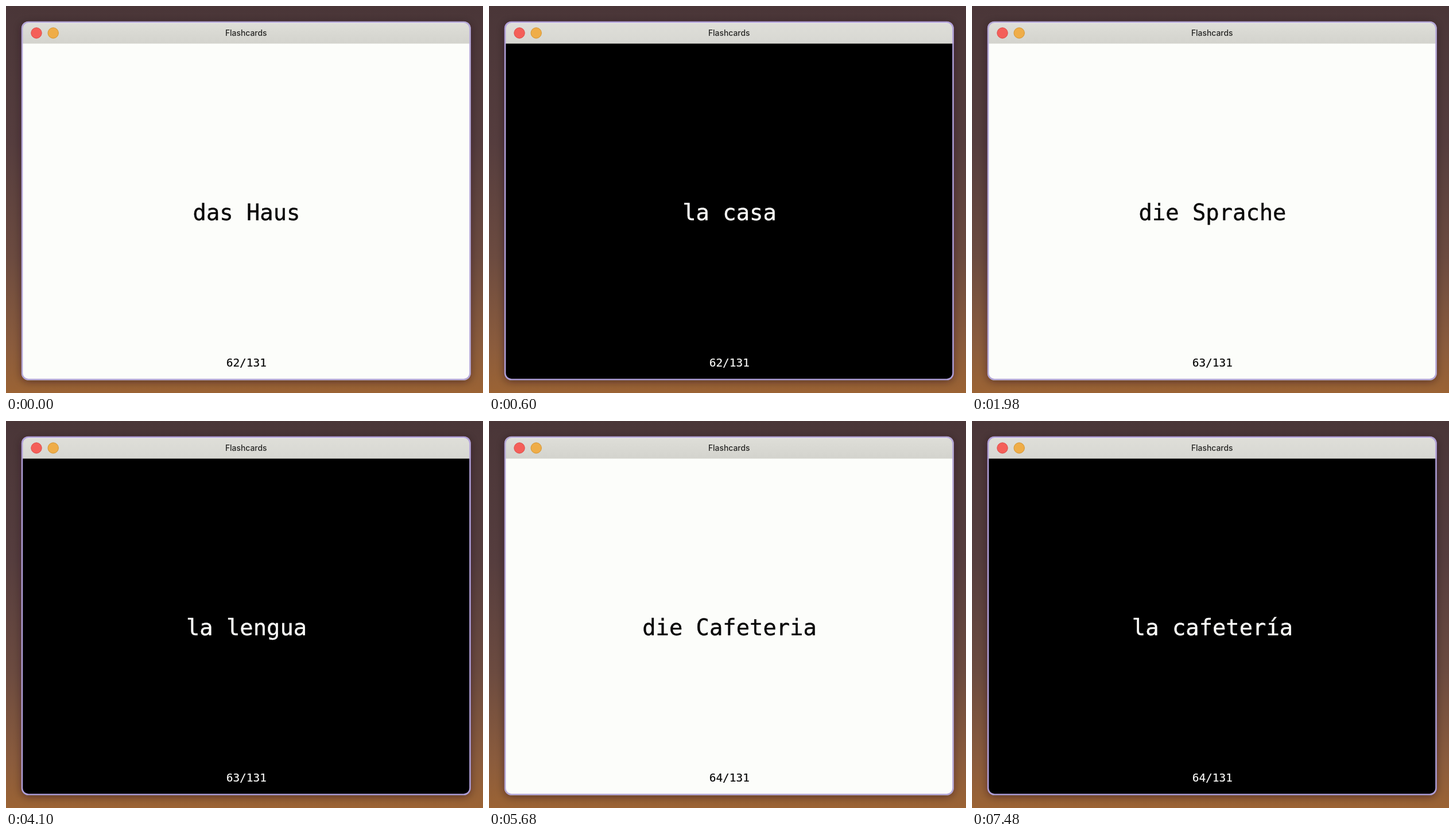
Recreate the animation shown at these times as an HTML page. Size 831 by 674 pixels, loop 8000 ms.

```html
<!DOCTYPE html>
<html lang="en">
<head>
<meta charset="utf-8">
<title>Flashcards</title>
<style>
  html, body { margin: 0; width: 100%; height: 100%; overflow: hidden; background: #5a4140; }
  svg { display: block; width: 100%; height: 100%; }
  text { text-anchor: middle; }
  .title { font: 500 13.9px Inter, Roboto, sans-serif; fill: #262624; }
  .mono { font-family: "DejaVu Sans Mono", "Noto Sans Mono", monospace; white-space: pre; }
  #word { font-size: 38.8px; stroke-width: .4px; }
  #count { font-size: 19.4px; stroke-width: .2px; }
  .front { --paper: #fcfdfa; --ink: #080808; --edge: #b3a6d6; --bar: #d3d3cd; }
  .back { --paper: #000; --ink: #fafaf8; --edge: #b09fd8; --bar: #d7d7d2; }
  #card { fill: var(--paper); }
  .mono { fill: var(--ink); stroke: var(--ink); }
  #edge { stroke: var(--edge); }
  #barEnd { stop-color: var(--bar); }
</style>
</head>
<body>
<svg id="stage" class="front" viewBox="0 0 831 674" preserveAspectRatio="none">
  <defs>
    <linearGradient id="desk" x2="0" y2="1">
      <stop offset="0" stop-color="#4a3638"/>
      <stop offset=".35" stop-color="#553d3e"/>
      <stop offset=".65" stop-color="#6c4b40"/>
      <stop offset=".88" stop-color="#8b5c3d"/>
      <stop offset="1" stop-color="#9b6334"/>
    </linearGradient>
    <linearGradient id="bar" x2="0" y2="1">
      <stop offset="0" stop-color="#dfdfd9"/>
      <stop id="barEnd" offset="1"/>
    </linearGradient>
    <filter id="blur" x="-10%" y="-10%" width="120%" height="120%">
      <feGaussianBlur stdDeviation="7"/>
    </filter>
    <clipPath id="frame"><rect x="27" y="27" width="782.5" height="624.5" rx="12"/></clipPath>
  </defs>

  <rect width="831" height="674" fill="url(#desk)"/>
  <rect x="27" y="30" width="782" height="624" rx="12" fill="#1c1014" opacity=".5" filter="url(#blur)"/>

  <g clip-path="url(#frame)">
    <rect id="card" x="27" y="65" width="783" height="587"/>
    <rect x="27" y="27" width="783" height="38.5" fill="url(#bar)"/>
    <rect x="27" y="29" width="783" height="1.2" fill="#efeeea"/>
  </g>
  <rect id="edge" x="28" y="28" width="780.5" height="622.5" rx="11" fill="none" stroke-width="2.6"/>

  <circle cx="53" cy="47" r="9.2" fill="#f45f59" stroke="#de4a47"/>
  <circle cx="82.2" cy="47" r="9.2" fill="#efad48" stroke="#d6952f"/>
  <text class="title" x="418.2" y="52">Flashcards</text>

  <text class="mono" id="word" x="419" y="373"></text>
  <text class="mono" id="count" x="418.8" y="628"></text>
</svg>

<script>
  const LOOP = 8000;
  // start time, side, word, card number
  const steps = [
    [0, 'front', 'das Haus', 62],
    [500, 'back', 'la casa', 62],
    [1870, 'front', 'die Sprache', 63],
    [4100, 'back', 'la lengua', 63],
    [5580, 'front', 'die Cafeteria', 64],
    [7380, 'back', 'la cafetería', 64]
  ];
  const byId = id => document.getElementById(id);
  const stage = byId('stage'), word = byId('word'), count = byId('count');
  const start = performance.now();
  let shown;

  function show(time) {
    const step = steps.findLast(([at]) => at <= time);
    if (step === shown) return;
    shown = step;
    const [, side, text, number] = step;
    stage.setAttribute('class', side);
    word.textContent = text;
    count.textContent = number + '/131';
  }

  function tick() {
    show((performance.now() - start) % LOOP);
    requestAnimationFrame(tick);
  }
  tick();
</script>
</body>
</html>
```
